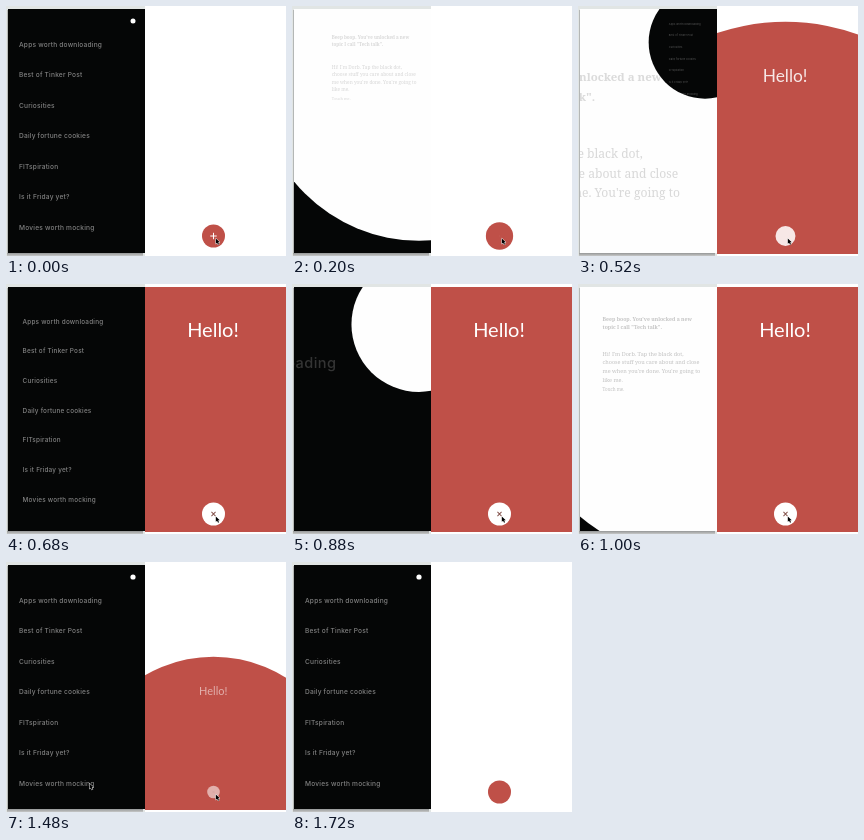
Recreate the animation shown at these times as an HTML page with a canvas. Size 280x250 px, loop 1760 ms.

```html
<!DOCTYPE html>
<html lang="en">
<head>
<meta charset="utf-8">
<title>Two panel menu loop</title>
<style>
  html, body { margin: 0; width: 100%; height: 100%; overflow: hidden; background: #fff; }
  canvas { display: block; width: 280px; height: 250px; }
</style>
</head>
<body>
<canvas id="stage" width="280" height="250"></canvas>
<script>
const ctx = document.getElementById('stage').getContext('2d');
const LOOP = 1760, STEP = 40, SWAP = 300;
const RED = '#bf5048', INK = '#050606', PAPER = '#fefefe';
const PANEL = { x: 2, y: 3, w: 137, h: 244 };
const DOT = { x: 127, y: 15 };
const BUTTON = { x: 207.5, y: 230, r: 11.5 };
const MIN_SCALE = BUTTON.r / 247;

// Left panel: each swap reveals one screen over the other.
const SWAPS = [
  { at: 0, to: 'page' },
  { at: 415, to: 'menu' },
  { at: 764, to: 'page' },
  { at: 1180, to: 'menu' }
];
const MENU = ['Apps worth downloading', 'Best of Tinker Post', 'Curiosities',
  'Daily fortune cookies', 'FITspiration', 'Is it Friday yet?', 'Movies worth mocking'];
const HEADLINE = ["Beep boop. You've unlocked a new", 'topic I call "Tech talk".'];
const INTRO = ["Hi! I'm Dorb. Tap the black dot,", 'choose stuff you care about and close',
  "me when you're done. You're going to", 'like me.'];

const clamp = v => Math.min(1, Math.max(0, v));
const ramp = (v, a, b) => clamp((v - a) / (b - a));
const lerp = (a, b, k) => a + (b - a) * k;
const ease = p => (1 - Math.cos(Math.PI * clamp(p))) / 2;
const gray = v => `rgb(${v},${v},${v})`;

function disc(x, y, r, color) {
  ctx.fillStyle = color;
  ctx.beginPath();
  ctx.arc(x, y, r, 0, Math.PI * 2);
  ctx.fill();
}

function scoped(draw) {
  ctx.save();
  draw();
  ctx.restore();
}

function clipRect(x, y, w, h) {
  ctx.beginPath();
  ctx.rect(x, y, w, h);
  ctx.clip();
}

function lines(list, y, gap, font, color) {
  ctx.font = font;
  ctx.fillStyle = color;
  list.forEach((s, i) => ctx.fillText(s, 13, y + i * gap));
}

function zoom(scale) {
  ctx.translate(139, 5);
  ctx.scale(scale, scale);
  ctx.translate(-139, -5);
}

function menuText(scale, alpha) {
  scoped(() => {
    zoom(scale);
    ctx.globalAlpha = alpha;
    ctx.letterSpacing = '0.2px';
    lines(MENU, 40.6, 30.55, '500 6.6px Inter, sans-serif', '#828282');
  });
}

function pageText(scale, alpha, contrast) {
  scoped(() => {
    zoom(scale);
    ctx.globalAlpha = alpha;
    const soft = gray(Math.round(lerp(180, 172, contrast)));
    const bold = gray(Math.round(lerp(184, 10, contrast)));
    lines(HEADLINE, 40, 9.6, 'bold 5.7px "Noto Serif", serif', bold);
    lines(INTRO, 78.3, 9.6, '500 6.03px "Noto Serif", serif', soft);
    lines(['Touch me.'], 117.8, 0, '4.9px "Noto Serif", serif', soft);
  });
}

function leftPanel(t) {
  const swap = SWAPS.filter(s => s.at <= t).pop();
  const p = (t - swap.at) / SWAP, e = ease(p);
  const toMenu = swap.to === 'menu';
  const inScale = lerp(0.15, 1, e), outScale = 1 + 3.7 * e;
  const outAlpha = 1 - ramp(p, 0.2, 0.5);

  clipRect(PANEL.x, PANEL.y, PANEL.w, PANEL.h);
  ctx.fillStyle = toMenu ? PAPER : INK;
  ctx.fillRect(PANEL.x, PANEL.y, PANEL.w, PANEL.h);
  if (toMenu) pageText(outScale, outAlpha, 1 - ramp(p, 0, 0.2));
  else menuText(outScale, outAlpha);

  // The dot sinks towards the panel's middle as it grows.
  const r = 2.5 + 216 * Math.pow(e, 1.07);
  disc(DOT.x, DOT.y + 78 * e, r, toMenu ? INK : PAPER);
  ctx.clip();
  if (toMenu) menuText(inScale, ramp(p, 0, 0.6));
  else pageText(inScale, ramp(p, 0.45, 0.86), ramp(p, 0.8, 1));

  const grow = toMenu ? ramp(p, 0.9, 1) : ramp(p, 1, 1.3);
  if (p > (toMenu ? 0.9 : 1)) {
    ctx.globalAlpha = lerp(0.4, 1, grow);
    disc(DOT.x, DOT.y, lerp(0.6, 2.6, grow), toMenu ? '#fff' : '#000');
  }
}

function cross(x, y, arm, turn, color, alpha) {
  scoped(() => {
    ctx.globalAlpha *= alpha;
    ctx.translate(x, y);
    ctx.rotate(turn);
    ctx.strokeStyle = color;
    ctx.lineWidth = 1;
    ctx.beginPath();
    ctx.moveTo(-arm, 0);
    ctx.lineTo(arm, 0);
    ctx.moveTo(0, -arm);
    ctx.lineTo(0, arm);
    ctx.stroke();
  });
}

function rightPanel(t) {
  const press = 1 - 0.016 * ramp(t, 1160, 1240);
  const open = press * (ease((t - 172) / 460) - ease((t - 1260) / 460));
  const s = lerp(MIN_SCALE, 1, open);
  clipRect(139, 3, 141, 245);
  disc(BUTTON.x, BUTTON.y, 247 * s, RED);

  if (open > 0.001) scoped(() => {
    ctx.translate(BUTTON.x, BUTTON.y);
    ctx.scale(s, s);
    ctx.globalAlpha = s;
    disc(0, 0, BUTTON.r, '#fff');
    cross(0, 0, 2.9, Math.PI / 4, '#86564f', ramp(t, 600, 680) * (1 - 0.75 * ramp(t, 1140, 1240)));
    ctx.fillStyle = '#fff';
    ctx.font = '400 20px Lato, sans-serif';
    ctx.textAlign = 'center';
    ctx.fillText('Hello!', -0.5, -177.5);
  });
  if (t < 170) cross(BUTTON.x, BUTTON.y, 3.2, 0, '#fff', 1 - ramp(t, 20, 170));
}

function cursor(x, y) {
  scoped(() => {
    ctx.translate(x, y);
    ctx.scale(0.8, 0.8);
    ctx.beginPath();
    [[0, 0], [0, 6.6], [1.6, 5.2], [2.8, 7.8], [4, 7.2], [2.9, 4.8], [5, 4.7]]
      .forEach(([px, py]) => ctx.lineTo(px, py));
    ctx.closePath();
    ctx.lineWidth = 1.2;
    ctx.strokeStyle = '#fff';
    ctx.stroke();
    ctx.fillStyle = '#000';
    ctx.fill();
  });
}

function backdrop() {
  ctx.fillStyle = '#fff';
  ctx.fillRect(0, 0, 280, 250);
  ctx.fillStyle = '#e1e5e4';
  ctx.fillRect(0, 0, 139, 250);
  const shade = ctx.createLinearGradient(0, 246, 0, 251);
  shade.addColorStop(0, '#858686');
  shade.addColorStop(1, '#d6d8d8');
  ctx.fillStyle = shade;
  ctx.fillRect(1, 246, 136, 4);
  ctx.fillStyle = '#b4b7b6';
  ctx.fillRect(1, 4, 1, 243);
}

function render(t) {
  backdrop();
  scoped(() => leftPanel(t));
  scoped(() => rightPanel(t));
  if (t < 1700) cursor(209.8, 232.5);
  if (t >= 1440 && t < 1580) cursor(83.5, 221.5);
}

const start = performance.now();
function tick() {
  const t = (performance.now() - start) % LOOP;
  render(Math.floor(t / STEP) * STEP);
  requestAnimationFrame(tick);
}
tick();
</script>
</body>
</html>
```
